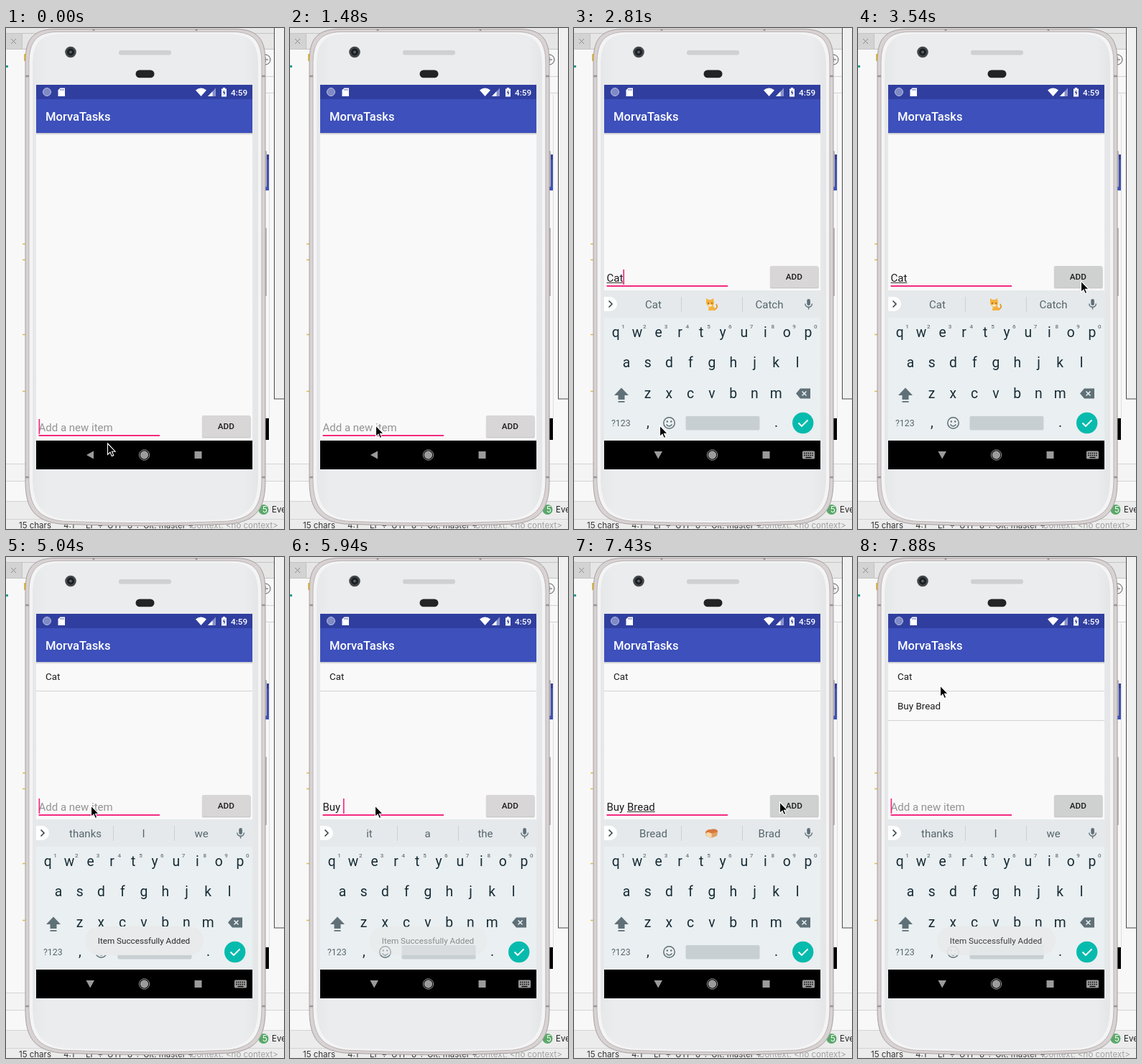
An HTML page that plays this animation: 387x697 px, repeating every 8 s.

```html
<!DOCTYPE html>
<html lang="en">
<head>
<meta charset="utf-8">
<title>To-do list demo</title>
<style>
  html, body { margin: 0; width: 100%; height: 100%; overflow: hidden; background: #f7f7f7; }
  svg { display: block; width: 387px; height: 697px; }
  text { font-family: Roboto, sans-serif; white-space: pre; }
  .ide text { font: 11.5px Inter, "Open Sans", sans-serif; }
  .mid { text-anchor: middle; }
  .key { font-size: 19.3px; fill: #172c36; }
  .num { font-size: 8px; font-weight: 500; fill: #68777e; }
  .sug { font-size: 15px; fill: #56666e; }
  .item { font-size: 13.4px; fill: #1c1c1c; }
  .field { font-size: 15px; fill: #1c1c1c; }
</style>
</head>
<body>
<svg viewBox="0 0 387 697">
  <defs>
    <linearGradient id="body" x1="0" x2="1">
      <stop offset="0" stop-color="#e6e7e9"/><stop offset=".06" stop-color="#ebecee"/>
      <stop offset=".94" stop-color="#ebecee"/><stop offset="1" stop-color="#e4e5e7"/>
    </linearGradient>
    <linearGradient id="drop" x1="0" x2="0" y1="0" y2="1">
      <stop offset="0" stop-color="#c2c2c5"/><stop offset="1" stop-color="#f9f9f9"/>
    </linearGradient>
    <path id="shell" d="M27 46C27 15 38 1.5 70 1.5H318C350 1.5 361 15 361 46V630C361 668 349 686 312 690Q194 695 76 690C39 686 27 668 27 630Z"/>
  </defs>

  <g class="ide">
    <rect width="387" height="697" fill="#f8f8f8"/>
    <rect width="387" height="30" fill="#e6e6e6"/>
    <rect y="8" width="22" height="21" fill="#d3d3d3"/>
    <path d="M7 15l7 7m0-7l-7 7" stroke="#8b8b8b"/>
    <path d="M0 7.5H387M0 29.5H387M22.5 8V29" stroke="#c4c4c4"/>
    <path d="M362 67.5h11M362 90.5h11" stroke="#d0d0d0"/>
    <rect y="52" width="3" height="3" fill="#2a9d8f"/>
    <rect x="25" y="36" width="6" height="10" fill="#e3b92f"/>
    <path d="M23 300.5h5M23 322.5h5M23 426.5h5M23 505.5h5" stroke="#d9bd45" stroke-width="1.5"/>
    <circle cx="361" cy="44" r="7" fill="#f4f4f4" stroke="#555"/>
    <path d="M357 44h8M361 40v8" stroke="#555"/>
    <rect x="355" y="176" width="11" height="50" fill="#3f51b5"/>
    <rect x="355" y="176" width="11" height="7" fill="#303f9f"/>
    <rect x="355" y="543" width="11" height="30" fill="#000"/>
    <path d="M366.5 92V543" stroke="#dedede"/>
    <rect x="373.5" y="-2" width="20" height="518" fill="#f0f0f0" stroke="#4a4a4a"/>
    <rect y="606" width="387" height="24" fill="#f4f4f4"/>
    <rect y="658" width="387" height="39" fill="#ececec"/>
    <path d="M0 606.5H387M0 630.5H387M0 658.5H387M0 683.5H387" stroke="#d4d4d4"/>
    <circle cx="358.500" cy="670" r="7" fill="#59a869"/>
    <text x="357" y="674" fill="#fff">5</text>
    <text x="370" y="674" fill="#222">Event</text>
    <g fill="#333">
      <text x="18" y="696">15 chars</text><text x="80" y="696">4:1</text>
      <text x="111" y="696">LF ÷</text><text x="141" y="696">UTF-8 ÷</text>
      <text x="191" y="696">Git: master ÷</text>
    </g>
    <text x="257" y="696" fill="#a0a0a0">Context: &lt;no context&gt;</text>
  </g>

  <g>
    <rect x="359" y="171" width="4" height="50" rx="1" fill="#b9b3b3"/>
    <rect x="359" y="278" width="4" height="95" rx="1" fill="#b9b3b3"/>
    <use href="#shell" fill="#d8d2d3" stroke="#a69fa0"/>
    <use href="#shell" transform="translate(5.8 3.800) scale(.97 .989)" fill="#f4f4f5" stroke="#b9b3b4"/>
    <use href="#shell" transform="translate(11.600 6.600) scale(.94 .981)" fill="url(#body)"/>
    <path d="M27 67h5M27 625h5M356 67h5M356 625h5M122 1v3M265 1v3" stroke="#9b9596" stroke-width="2.500"/>
    <circle cx="90" cy="33.500" r="7.800" fill="#45484b"/>
    <circle cx="90" cy="33.500" r="5" fill="#1c1f22"/>
    <circle cx="90" cy="33.500" r="2" fill="#54606b"/>
    <rect x="157" y="31" width="73" height="6.500" rx="3.200" fill="#cfd0d2"/>
    <rect x="180.500" y="58.500" width="26" height="10.800" rx="5.400" fill="#222325"/>
  </g>

  <g>
    <rect x="42" y="79" width="301" height="535" fill="#f9f9f9"/>
    <rect x="42" y="146" width="301" height="3" fill="url(#drop)"/>
    <rect x="42" y="79" width="301" height="20" fill="#303f9f"/>
    <rect x="42" y="99" width="301" height="47" fill="#3d50bb"/>
    <circle cx="57" cy="89" r="5.500" fill="#7f8ac6" stroke="#b7bde0"/>
    <path d="M75.500 83.500H82V95H72.500V86.500Z" fill="#fff"/>
    <path d="M76 85v2M78 85v2M80 85v2" stroke="#303f9f" stroke-width=".8"/>
    <path d="M264 86.500Q271.500 80.500 279 86.500L271.500 95Z" fill="#fff"/>
    <path d="M281 95L292 83.500V95Z" fill="#8993cb"/><path d="M281 95L287.500 88.200V95Z" fill="#fff"/>
    <path d="M300 84.500h2v-1.500h3v1.500h2V95.500h-7Z" fill="#fff"/>
    <path d="M304 86l-2.200 4.200h1.600V94l2.200-4.500H304Z" fill="#303f9f"/>
    <text x="313" y="93.500" font-size="11.700" font-weight="500" fill="#fff">4:59</text>
    <text x="55" y="129" font-size="16.600" font-weight="500" fill="#fff">MorvaTasks</text>

    <g id="item1"><text class="item" x="55" y="171.300">Cat</text><path d="M42 186.500H343" stroke="#d3d3d3"/></g>
    <g id="item2"><text class="item" x="55" y="212">Buy Bread</text><path d="M42 227.500H343" stroke="#d3d3d3"/></g>

    <g id="row">
      <text id="hint" class="field" x="45.500" y="352.500" style="fill:#939393">Add a new item</text>
      <text id="done" class="field" x="45.500" y="352.500"></text>
      <text id="comp" class="field" y="352.500"></text>
      <rect id="under" y="354" height="1" fill="#333"/>
      <rect id="caret" y="336" width="1.700" height="21" fill="#f42a80"/>
      <rect x="45.500" y="358" width="168.500" height="2" fill="#f42a80"/>
      <rect x="272.500" y="332" width="68.500" height="31" rx="2" fill="#000" opacity=".07"/>
      <rect x="273" y="332" width="67.500" height="30" rx="2" fill="#000" opacity=".14"/>
      <rect id="button" x="273" y="331" width="67" height="30" rx="2"/>
      <text class="mid" x="306.300" y="350.300" font-size="11.700" font-weight="500" fill="#1c1c1c">ADD</text>
    </g>

    <rect x="42" y="574" width="301" height="40" fill="#000"/>
    <g fill="#9b9b9b">
      <path id="back"/>
      <circle cx="192.500" cy="594" r="5.700"/>
      <circle cx="192.500" cy="594" r="7.200" fill="none" stroke="#9b9b9b"/>
      <rect x="262.500" y="589" width="10" height="10"/>
      <g id="kbIcon">
        <rect x="318" y="588.500" width="17" height="11" rx="1.500"/>
        <path d="M320 591.500h13M320 594.500h13" stroke="#000" stroke-width="1.500" stroke-dasharray="1.500 1.300"/>
        <path d="M322.500 597.500h8" stroke="#000" stroke-width="1.300"/>
      </g>
    </g>

    <g id="kb">
      <rect x="42" y="365" width="301" height="209" fill="#eaeff1"/>
      <rect x="42" y="365" width="301" height="38" fill="#e5e9eb"/>
      <path d="M42 374H50A10 10 0 0 1 50 394H42Z" fill="#fff"/>
      <path d="M48.500 379.500l4.500 4.500l-4.500 4.500" fill="none" stroke="#37474f" stroke-width="1.600"/>
      <g fill="#5f7078">
        <rect x="324.300" y="377" width="4.600" height="9" rx="2.300"/>
        <path d="M321.800 383.500a4.800 4.800 0 0 0 9.600 0M326.600 388.500v3" fill="none" stroke="#5f7078" stroke-width="1.400"/>
        <path d="M66 500.500L76 511H70.500V517H61.500V511H56Z"/><rect x="61.500" y="519" width="9" height="1.800"/>
        <path d="M309 508.500L315 501.500H329V515.500H315Z"/>
      </g>
      <path d="M317.500 505.500l6 6m0-6l-6 6" stroke="#eaeff1" stroke-width="1.500"/>
      <g id="sugs">
        <path d="M149.500 374V395M234.500 374V395" stroke="#cbd1d4"/>
        <text class="sug mid" x="110.500" y="390"></text>
        <text class="sug mid" x="191.500" y="390"></text>
        <text class="sug mid" x="272" y="390"></text>
      </g>
      <g id="cat" fill="#f6b23c">
        <path d="M184 376l3 2h4l3-2l1 7q-1 5-5 5t-6-5Z"/>
        <path d="M188 386q8-1 9 7h-10Z"/>
        <path d="M196 391q5-1 2-7" fill="none" stroke="#e09a2b" stroke-width="1.800"/>
        <path d="M187 382v1.500M192 382v1.500" stroke="#5d4037" stroke-width="1.300"/>
        <ellipse cx="189.500" cy="386" rx="2.500" ry="1.500" fill="#fff0d5"/>
      </g>
      <g id="bread">
        <path d="M183 384q0-3 4-4.500l7-1q6 0 6 4l-1 5.500l-8 3l-7-3Z" fill="#e0a066"/>
        <path d="M183 384q0-3 4-4.500l7-1q6 0 6 4l-8 2Z" fill="#d9783f"/>
        <path d="M184 384q2-2 6 0q3 1 1.500 3v4l-7-3Z" fill="#f7d9a8"/>
      </g>
      <g id="keys"></g>
      <text x="52" y="554.300" font-size="12.300" fill="#56666e">?123</text>
      <g fill="none" stroke="#5f7078" stroke-width="1.500">
        <circle cx="132.500" cy="549.500" r="7.700"/><path d="M128.500 551.500q4 5 8 0"/>
      </g>
      <circle cx="129.800" cy="547.500" r="1.200" fill="#5f7078"/><circle cx="135.200" cy="547.500" r="1.200" fill="#5f7078"/>
      <rect x="155.500" y="540" width="103" height="19.500" rx="2" fill="#c8cfd3"/>
      <circle cx="318.700" cy="549.500" r="14.700" fill="#06bbad"/>
      <path d="M312.500 549.500l4.500 4.500l8.500-8.500" fill="none" stroke="#fff" stroke-width="1.900"/>
    </g>

    <g id="toast">
      <rect x="110" y="514" width="165" height="40" rx="20" fill="#e8eaeb"/>
      <text class="mid" x="192" y="538.200" font-size="11.700" fill="#2b2b2b">Item Successfully Added</text>
    </g>
  </g>

  <path id="mouse" d="M0 0V15.500L3.500 12.200L5.800 17.600L8.300 16.600L6 11.200H10.600Z" fill="#000" stroke="#fff" stroke-width="1.100"/>
</svg>
<script>
const LOOP = 8000, LEFT = 45.5;
const $ = id => document.getElementById(id);

// Keyboard letters: text, first centre, baseline
const STEP = 29.75;
const label = (cls, x, y, s) => `<text class="${cls} mid" x="${x}" y="${y}">${s}</text>`;
const line = (s, x, y) => [...s].map((c, i) => label("key", x + i * STEP, y, c)).join("");
$("keys").innerHTML = line("qwertyuiop", 58.2, 430) + line("asdfghjkl", 73, 472) +
  line("zxcvbnm", 102.6, 514.5) + label("key", 103, 555, ",") + label("key", 281.5, 555, ".") +
  [..."1234567890"].map((c, i) => label("num", 68.5 + i * STEP, 418.2, c)).join("");

// Each step changes part of the state and holds until the next one.
const start = { x: 141.5, y: 578, open: 0, drop: 0, fade: 1, caret: 1, done: "", comp: "", sug: "", items: 0, toast: 0, press: 0 };
const steps = [
  [440, { caret: 0 }],
  [590, { x: 136, y: 570 }],
  [740, { x: 124, y: 557 }],
  [880, { x: 119.5, y: 553, caret: 1 }],
  [1480, { caret: 0 }],
  [1920, { caret: 1, open: 1, drop: 24, fade: .4 }],
  [2070, { drop: 10, fade: .85 }],
  [2210, { drop: 3, fade: .97, comp: "C" }],
  [2360, { drop: 0, fade: 1, comp: "Ca", sug: "C|I|Can" }],
  [2510, { comp: "Cat", sug: "Ca|Can|Car" }],
  [2810, { sug: "Cat|cat|Catch" }],
  [2960, { x: 148, y: 522 }],
  [3110, { x: 206, y: 456, caret: 0 }],
  [3260, { x: 268, y: 393 }],
  [3400, { x: 305, y: 357 }],
  [3540, { x: 310.5, y: 352, press: 1 }],
  [3690, { comp: "", items: 1 }],
  [3840, { press: 0, sug: "thanks|I|we", toast: .4 }],
  [3990, { toast: .9 }],
  [4140, { x: 264, y: 349, caret: 1, toast: 1 }],
  [4290, { x: 186, y: 345 }],
  [4440, { x: 130, y: 346 }],
  [4590, { x: 118.5, y: 346, caret: 0 }],
  [5040, { caret: 1 }],
  [5190, { comp: "B" }],
  [5340, { sug: "B|But|Be" }],
  [5490, { comp: "Bu" }],
  [5640, { comp: "Buy", sug: "Bu|But|Buy" }],
  [5790, { sug: "Buy|But|Buying", toast: .8 }],
  [5940, { done: "Buy ", comp: "", sug: "it|a|the", toast: .5 }],
  [6090, { toast: 0 }],
  [6240, { comp: "B" }],
  [6390, { comp: "Br", sug: "B|But|Back" }],
  [6540, { comp: "Bre", sug: "Br|Bro|Bring" }],
  [6690, { comp: "Brea", sug: "Bre|Bread|Break" }],
  [6840, { comp: "Bread", sug: "Brea|Bread|Break" }],
  [6990, { sug: "Bread|bread|Brad" }],
  [7140, { x: 178, y: 350 }],
  [7290, { x: 266, y: 344, caret: 0 }],
  [7430, { x: 286.5, y: 341, press: 1 }],
  [7580, { done: "", comp: "", items: 2 }],
  [7730, { x: 205, y: 265, sug: "thanks|I|we", toast: .4 }],
  [7880, { x: 114.5, y: 179, caret: 1, toast: .9 }]
];
let last = start;
const poses = [[0, start], ...steps.map(([t, change]) => [t, last = { ...last, ...change }])];

const sugTexts = $("sugs").querySelectorAll("text");
const show = (id, on) => { $(id).style.display = on ? "" : "none"; };
const move = (id, x, y) => $(id).setAttribute("transform", `translate(${x} ${y})`);

function draw(s) {
  move("mouse", s.x, s.y);
  move("row", 0, s.open ? 0 : 208);
  move("kb", 0, s.drop);
  show("kb", s.open);
  show("kbIcon", s.open);
  $("kb").style.opacity = s.fade;
  $("back").setAttribute("d", s.open ? "M111.5 589H123L117.2 599.5Z" : "M112 594L122 588.5V599.5Z");
  show("item1", s.items > 0);
  show("item2", s.items > 1);
  $("toast").style.opacity = s.toast;
  $("button").setAttribute("fill", s.press ? "#cfd0d0" : "#d8d6d7");

  show("hint", !(s.done + s.comp));
  $("done").textContent = s.done;
  $("comp").textContent = s.comp;
  const from = LEFT + (s.done ? $("done").getComputedTextLength() : 0);
  const width = s.comp ? $("comp").getComputedTextLength() : 0;
  $("comp").setAttribute("x", from);
  $("under").setAttribute("x", from);
  $("under").setAttribute("width", width);
  $("caret").setAttribute("x", from + width);
  show("caret", s.caret);

  const words = s.sug.split("|");
  show("sugs", s.sug);
  show("cat", words[1] === "cat");
  show("bread", words[1] === "bread");
  sugTexts.forEach((el, i) => {
    const picture = words[i] === "cat" || words[i] === "bread";
    el.textContent = picture ? "" : words[i] || "";
  });
}

let shown;
function tick() {
  const t = performance.now() % LOOP;
  const pose = poses.findLast(p => p[0] <= t)[1];
  if (pose !== shown) draw(shown = pose);
  requestAnimationFrame(tick);
}
tick();
document.fonts.ready.then(() => draw(shown));
</script>
</body>
</html>
```
